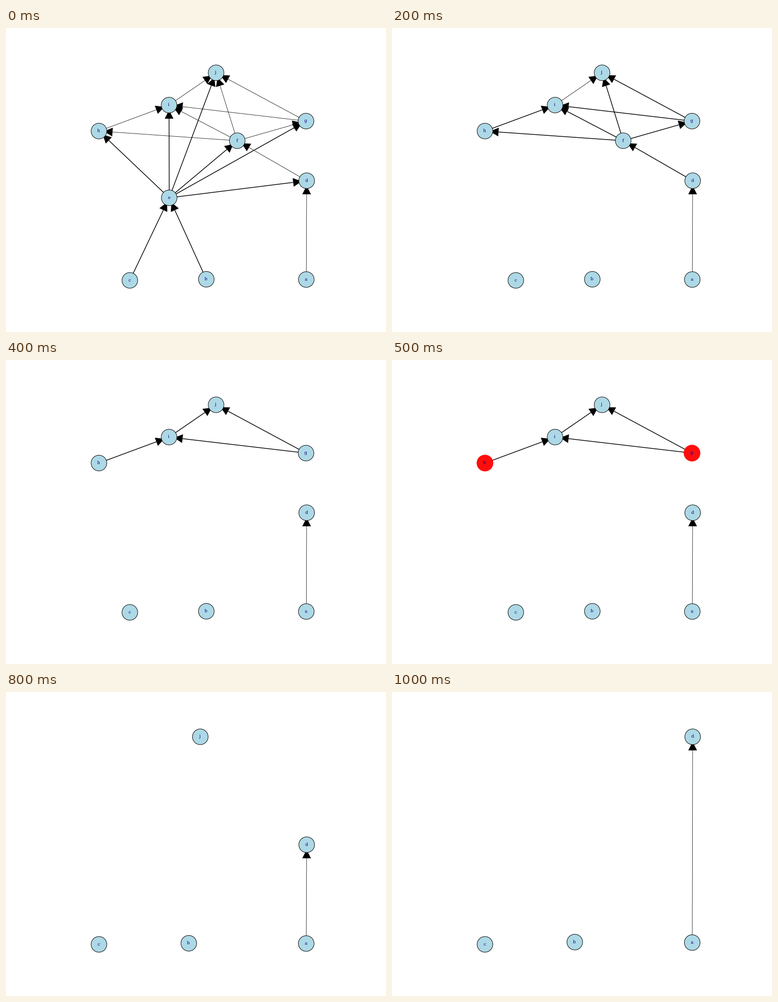
A matplotlib script that plays this animation: 800x640 px, repeating every 1.1 s.

```python
import numpy as np
import matplotlib.pyplot as plt
from matplotlib.animation import FuncAnimation
from matplotlib.patches import Circle, Polygon

W, H, DPI = 800, 640, 100
PX = 72 / DPI  # points per pixel
LEFT, RIGHT, TOP, BOTTOM = 195.7, 633.0, 94.3, 531.3
RADIUS, HEAD_LEN, HEAD_HALF, HEAD_BASE = 16.5, 18, 9.2, 28.6
RED = "#ff0000"

NODES = {
    "a": (632.2, 529.5), "b": (421.7, 529.0), "c": (260.7, 531.3),
    "d": (633.0, 321.5), "e": (343.6, 357.5), "f": (486.8, 237.3),
    "g": (631.6, 196.0), "h": (195.7, 217.0), "i": (343.3, 162.3),
    "j": (442.3, 94.3),
}
EDGES = "ad be ce df ed ee ef eg eh ei ej fg fh fi fj gi gj hi ij".split()
EDGES.remove("ee")

# One stage per elimination: nodes to remove, nodes with heavy edges.
# Each stage shows the plain graph, then the marked one.
STAGES = [("e", "e"), ("f", "fgh"), ("gh", "ghi"), ("i", "i"), ("j", ""), ("", "")]

fig = plt.figure(figsize=(W / DPI, H / DPI), dpi=DPI, facecolor="white")
ax = fig.add_axes([0, 0, 1, 1])


def fit(names):
    """Stretch the remaining nodes over the fixed layout box."""
    pts = np.array([NODES[n] for n in names])
    lo, hi = pts.min(axis=0), pts.max(axis=0)
    size = np.array([RIGHT - LEFT, BOTTOM - TOP])
    return dict(zip(names, (LEFT, TOP) + (pts - lo) / (hi - lo) * size))


def arrow(p, q, color, width):
    u = (p - q) / np.hypot(*(p - q))
    side = np.array([-u[1], u[0]]) * HEAD_HALF
    base = q + u * HEAD_BASE
    tip = base - u * HEAD_LEN
    ax.plot(*zip(p, base), color=color, lw=width * PX, solid_capstyle="butt")
    ax.add_patch(Polygon([tip, base + side, base - side], fc=color, lw=0, zorder=2))


def node(name, p, fill, stroke, width):
    ax.add_patch(Circle(p, RADIUS, fc=fill, ec=stroke, lw=width * PX, zorder=3))
    ax.text(p[0] - 0.7, p[1] - 0.3, name, color="#00008b", fontsize=10.3 * PX,
            family="DejaVu Serif", stretch="condensed",
            ha="center", va="center", zorder=4)


def draw(k):
    ax.clear()
    ax.set(xlim=(0, W), ylim=(H, 0))
    ax.axis("off")
    stage, marked = divmod(k, 2)
    doomed, heavy = STAGES[stage]
    gone = "".join(s[0] for s in STAGES[:stage])
    pos = fit([n for n in NODES if n not in gone])
    hub = doomed in ("e", "f")

    for s, t in EDGES:
        if s in pos and t in pos:
            hot = marked and hub and s == doomed
            thick = s in heavy or t in heavy
            arrow(pos[s], pos[t], RED if hot else "black", 1.5 if thick else 0.8)

    for name, p in pos.items():
        if marked and name in doomed:
            node(name, p, "#ffa500" if hub else "#ff0d0d", RED if hub else "#ff0d0d", 2)
        else:
            node(name, p, "#add8e6", "black", 1)
    return []


anim = FuncAnimation(fig, draw, frames=11, interval=100, init_func=lambda: [],
                     repeat=True, repeat_delay=0)
plt.show()
```
